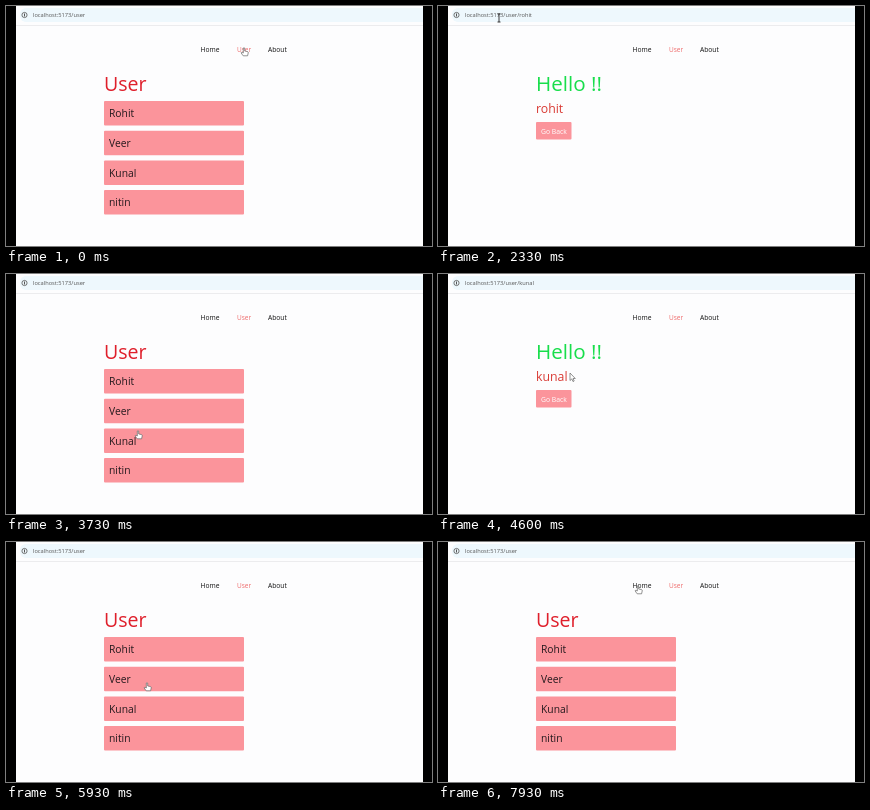
Animation, 426 px wide and 240 px high, one loop 8000 ms. Source, as an HTML page with a canvas:

```html
<!DOCTYPE html>
<html lang="en">
<head>
<meta charset="utf-8">
<title>User routes</title>
<style>
  html, body { margin: 0; width: 100%; height: 100%; overflow: hidden; background: #000; }
  canvas { display: block; width: 426px; height: 240px; }
</style>
</head>
<body>
<canvas id="stage" width="426" height="240"></canvas>
<script>
const ctx = document.getElementById('stage').getContext('2d');
const LOOP = 8000, STEP = 1000 / 15;
const TRAVEL = 600, CLICK_DELAY = 150;
const USERS = ['Rohit', 'Veer', 'Kunal', 'nitin'];
const PINK = '#fb949b';
const LEFT = 98;
const rowY = i => 95 + i * 29.7;

const spots = {
  userLink: { x: 238, y: 42, kind: 'hand' },
  homeLink: { x: 200, y: 44, kind: 'hand' },
  firstRow: { x: 132, y: 106, kind: 'hand' },
  secondRow: { x: 141, y: 141, kind: 'hand' },
  thirdRow: { x: 132, y: 157, kind: 'hand' },
  name: { x: 132, y: 99, kind: 'arrow' },
  button: { x: 121, y: 128, kind: 'arrow' },
  address: { x: 61, y: 12, kind: 'beam' }
};

// The pointer reaches each spot at `at`; a click there opens a profile, or the list if ''.
const visits = [
  { at: 0, spot: spots.userLink },
  { at: 650, spot: spots.firstRow, opens: 'rohit' },
  { at: 1300, spot: spots.button },
  { at: 2300, spot: spots.address },
  { at: 3050, spot: spots.button, opens: '' },
  { at: 3700, spot: spots.thirdRow, opens: 'kunal' },
  { at: 4600, spot: spots.name },
  { at: 5000, spot: spots.address },
  { at: 5400, spot: spots.button, opens: '' },
  { at: 5900, spot: spots.secondRow },
  { at: 7800, spot: spots.homeLink }
];

function text(value, x, y, size, color) {
  ctx.font = `${size}px "Open Sans", "Noto Sans", sans-serif`;
  ctx.fillStyle = color;
  ctx.fillText(value, x, y);
}

function box(x, y, w, h, color, radius = 0) {
  ctx.fillStyle = color;
  ctx.beginPath();
  ctx.roundRect(x, y, w, h, radius);
  ctx.fill();
}

function drawBrowser(name) {
  box(0, 0, 426, 240, '#000');
  box(10, 0, 407, 240, '#fdfdfe');
  box(14, 2, 403, 14, '#eef8fd', [6, 0, 0, 6]);
  box(10, 19, 407, 1, '#ececee');
  ctx.strokeStyle = '#555';
  ctx.lineWidth = 0.8;
  ctx.beginPath();
  ctx.arc(18.5, 9, 2.6, 0, Math.PI * 2);
  ctx.stroke();
  box(18, 7.5, 1, 3, '#555');
  text('localhost:5173/user' + (name && '/' + name), 27, 11, 5.7, '#555');
  text('Home', 194.5, 45.5, 6.7, '#111');
  text('User', 231, 45.5, 6.5, '#ee6b6b');
  text('About', 262, 45.5, 6.7, '#111');
}

function drawList() {
  text('User', LEFT, 85, 19.6, '#df1f2b');
  USERS.forEach((user, i) => {
    box(LEFT, rowY(i), 140, 24.5, PINK, 1);
    text(user, LEFT + 5, rowY(i) + 16.2, 10.3, '#22181c');
  });
}

function drawProfile(name) {
  text('Hello !!', LEFT, 85, 20.6, '#18de4b');
  text(name, LEFT, 106.5, 12.3, '#d93a34');
  box(LEFT, 116, 35.5, 17.5, PINK, 1);
  text('Go Back', LEFT + 5, 127.5, 6.8, '#fff');
}

const shapes = {
  arrow: new Path2D('M0 0V7.5L1.8 5.9 3 8.6 4.2 8 3 5.5H5.3Z'),
  hand: new Path2D('M-.7 0Q0-.8.7 0V3L3.6 3.6Q4.4 3.8 4.2 5L3.6 7.8H-.8L-3 4.8Q-2.6 3.8-.7 5Z'),
  beam: new Path2D('M-1.5-4H1.5M0-4V4M-1.5 4H1.5')
};

function drawPointer(x, y, kind) {
  const beam = kind === 'beam';
  ctx.save();
  ctx.translate(x, y);
  ctx.fillStyle = '#fff';
  ctx.strokeStyle = beam ? '#222' : '#666';
  ctx.lineWidth = beam ? 0.9 : 0.7;
  if (!beam) ctx.fill(shapes[kind]);
  ctx.stroke(shapes[kind]);
  ctx.restore();
}

function pointerAt(t) {
  const i = visits.findLastIndex(v => v.at <= t);
  const from = visits[i], to = visits[i + 1] || from;
  const leave = Math.max(from.at + CLICK_DELAY, to.at - TRAVEL);
  const u = Math.max(0, t - leave) / Math.max(1, to.at - leave);
  const k = to === from ? 0 : u * u * (3 - 2 * u);
  const mix = axis => from.spot[axis] + (to.spot[axis] - from.spot[axis]) * k;
  const kind = k < 0.08 ? from.spot.kind : k > 0.92 ? to.spot.kind : 'arrow';
  return [mix('x'), mix('y'), kind];
}

function pageAt(t) {
  const click = visits.findLast(v => 'opens' in v && v.at + CLICK_DELAY <= t);
  return click ? click.opens : '';
}

function frame(now) {
  const t = Math.floor((now % LOOP + 4) / STEP) * STEP % LOOP;
  const name = pageAt(t);
  drawBrowser(name);
  if (name) drawProfile(name);
  else drawList();
  drawPointer(...pointerAt(t));
  requestAnimationFrame(frame);
}
requestAnimationFrame(frame);
</script>
</body>
</html>
```
